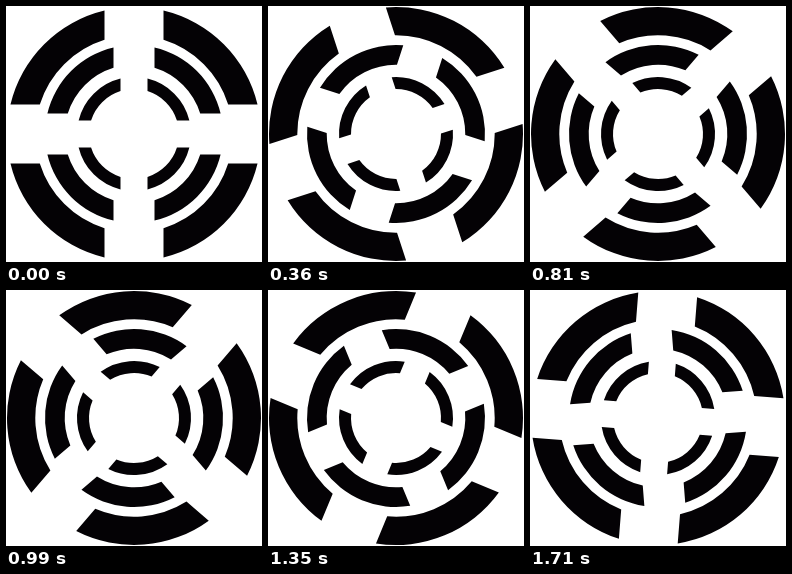
Recreate the animation shown at these times as an HTML page. Size 256 by 256 pixels, loop 1.8 s.

```html
<!DOCTYPE html>
<html lang="en">
<head>
<meta charset="utf-8">
<title>Counter-rotating rings</title>
<style>
  html, body { margin: 0; width: 100%; height: 100%; overflow: hidden; background: #fff; }
  svg { display: block; width: 100%; height: 100%; }
</style>
</head>
<body>
<svg id="stage" viewBox="0 0 256 256" fill="#040205"></svg>
<script>
  const LOOP = 1800, STEP = 90, CENTER = 128;
  const NS = 'http://www.w3.org/2000/svg';
  const stage = document.getElementById('stage');

  // gap is the half width of the straight slots between the pieces
  const rings = [
    { outer: 127, inner: 98.7, gap: 29.5, dir: -1 },
    { outer: 89, inner: 69.3, gap: 20.5, dir: 1 },
    { outer: 57, inner: 45, gap: 13.5, dir: -1 }
  ];

  function piecePath({ outer, inner, gap }) {
    const far = Math.sqrt(outer * outer - gap * gap);
    const near = Math.sqrt(inner * inner - gap * gap);
    return `M${gap} ${-far}A${outer} ${outer} 0 0 1 ${far} ${-gap}` +
           `L${near} ${-gap}A${inner} ${inner} 0 0 0 ${gap} ${-near}Z`;
  }

  for (const ring of rings) {
    ring.node = document.createElementNS(NS, 'g');
    for (let i = 0; i < 4; i++) {
      const piece = document.createElementNS(NS, 'path');
      piece.setAttribute('d', piecePath(ring));
      piece.setAttribute('transform', `rotate(${i * 90})`);
      ring.node.appendChild(piece);
    }
    stage.appendChild(ring.node);
  }

  // A quarter turn per loop, in hard steps
  function draw(time) {
    const step = Math.floor((time % LOOP) / STEP);
    const angle = step * 90 * STEP / LOOP;
    for (const { node, dir } of rings) {
      node.setAttribute('transform', `translate(${CENTER} ${CENTER}) rotate(${dir * angle})`);
    }
  }

  const start = performance.now();
  function tick() {
    draw(performance.now() - start);
    requestAnimationFrame(tick);
  }
  draw(0);
  requestAnimationFrame(tick);
</script>
</body>
</html>
```
